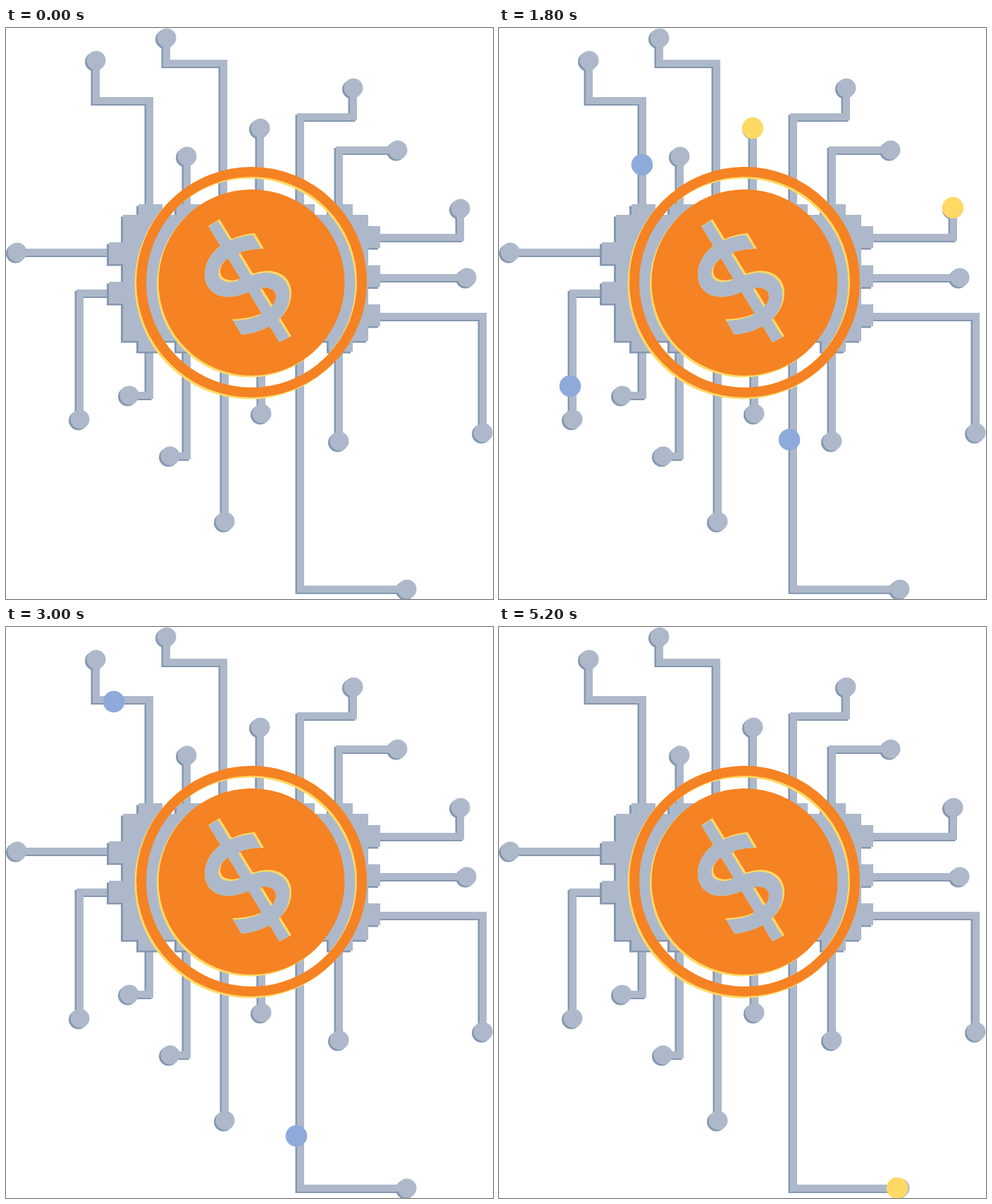
An HTML page that plays this animation: 691x810 px, repeating every 5.4 s.

```html
<!DOCTYPE html>
<html lang="en">
<head>
<meta charset="utf-8">
<title>Digital coin circuit</title>
<style>
  html, body { margin: 0; width: 100%; height: 100%; overflow: hidden; background: #fff; }
  svg { display: block; width: 691px; height: 810px; }
  .light { color: #adb9ca; }
  .dark { color: #8497b0; }
  .orange { color: #f58223; }
  .yellow { color: #ffd966; }
  .wire, .node, .ring { fill: none; stroke: currentColor; }
  .wire { stroke-width: 10; }
  .node { stroke-width: 27; stroke-linecap: round; }
  .ring { stroke-width: 14; }
  .fill { fill: currentColor; }
</style>
</head>
<body>
<svg viewBox="0 0 691 810">
  <defs>
    <g id="wires"></g>
    <g id="board">
      <use href="#wires" class="dark" x="-2.5" y="2"/>
      <use href="#wires" class="light"/>
    </g>
    <g id="chip" class="fill"><rect x="166" y="265" width="348" height="179"/></g>
    <g id="coin">
      <circle class="ring" cx="348.5" cy="360.5" r="156.5"/>
      <circle class="fill" cx="348.5" cy="361" r="132"/>
    </g>
    <!-- The S is one half turned around its centre. -->
    <path id="half" d="M353 291C315 294 282 318 282 350C282 372 300 384 322 381Q336 379 347 373
      L340 353Q330 357 322 358C310 358 304 353 304 345C304 327 332 313 366 313Z"/>
    <g id="sign">
      <use href="#half"/>
      <use href="#half" transform="rotate(180 343.5 363)"/>
      <path d="M287 281L303 271L405 437L388 446Z"/>
    </g>
    <mask id="inSign"><use href="#sign" fill="#fff"/></mask>
    <clipPath id="inCoin"><circle cx="348.5" cy="360.5" r="156"/></clipPath>
  </defs>

  <use href="#board"/>
  <g id="pulses"></g>
  <use href="#board" clip-path="url(#inCoin)"/>
  <use href="#chip" class="dark" x="-3" y="2.5"/>
  <use href="#chip" class="light"/>

  <use href="#coin" class="yellow" x="-2.5" y="2.5"/>
  <use href="#coin" class="orange"/>
  <use href="#sign" class="yellow fill"/>
  <g mask="url(#inSign)"><use href="#sign" class="light fill" x="-2.5" y="2.5"/></g>
</svg>
<script>
  const STEP = 200, STEPS = 27;
  const SPEED = 23;   // pixels per step
  const PAUSE = 7;    // all pulses rest during this step
  const GLOW = 2;     // steps a node stays lit

  function add(parent, tag, attrs) {
    const el = document.createElementNS("http://www.w3.org/2000/svg", tag);
    for (const name in attrs) el.setAttribute(name, attrs[name]);
    return document.getElementById(parent).appendChild(el);
  }

  // Every wire starts at its node and ends under the chip.
  const wires = [
    "M128 46V103H204V260", "M228 14V50H309V260", "M257 182V260", "M361 142V260",
    "M493 85V126H418V260", "M556 173H473V260", "M645 256V297H515", "M654 354H515",
    "M677 574V409H515", "M16 318H160", "M105 555V376H160", "M175 521H204V450",
    "M233 607H257V450", "M311 700V450", "M363 547V450", "M473 586V450", "M569 796H418V450"
  ];
  for (const d of wires) {
    add("wires", "path", { class: "wire", d });
    add("wires", "path", { class: "node", d: d.match(/M\d+ \d+/) + "h0" });
  }

  const pin = (x, y) => add("chip", "rect", { x, y, width: 34, height: 31 });
  for (let i = 0; i < 6; i++) {
    pin(188 + 54 * i, 250);
    pin(188 + 54 * i, 428);
  }
  for (let i = 0; i < 3; i++) pin(497, 281 + 55.5 * i);
  for (let i = 0; i < 2; i++) pin(146, 304 + 56 * i);

  const pulses = [
    { start: 1, route: "M131 377H101V555" },
    { start: 0, route: "M510 297H644V255" },
    { start: 0, route: "M360 311V142" },
    { start: 4, route: "M203 286V106H132L128 46" },
    { start: 0, route: "M412 400V796H565" }
  ].map(({ start, route }) => ({
    start,
    path: add("pulses", "path", { d: route, fill: "none" }),
    dot: add("pulses", "circle", { r: 15.3 })
  }));

  function draw() {
    const step = Math.floor(performance.now() / STEP) % STEPS;
    const beat = step < PAUSE ? step : step - 1;
    for (const { start, path, dot } of pulses) {
      const length = path.getTotalLength();
      const moved = (beat - start) * SPEED;
      const arrival = start + Math.ceil(length / SPEED);
      const { x, y } = path.getPointAtLength(Math.max(0, Math.min(moved, length)));
      dot.setAttribute("cx", x);
      dot.setAttribute("cy", y);
      dot.setAttribute("fill", beat >= arrival ? "#ffd966" : "#8eaadb");
      dot.setAttribute("visibility", beat >= start && beat < arrival + GLOW ? "visible" : "hidden");
    }
    requestAnimationFrame(draw);
  }
  draw();
</script>
</body>
</html>
```
